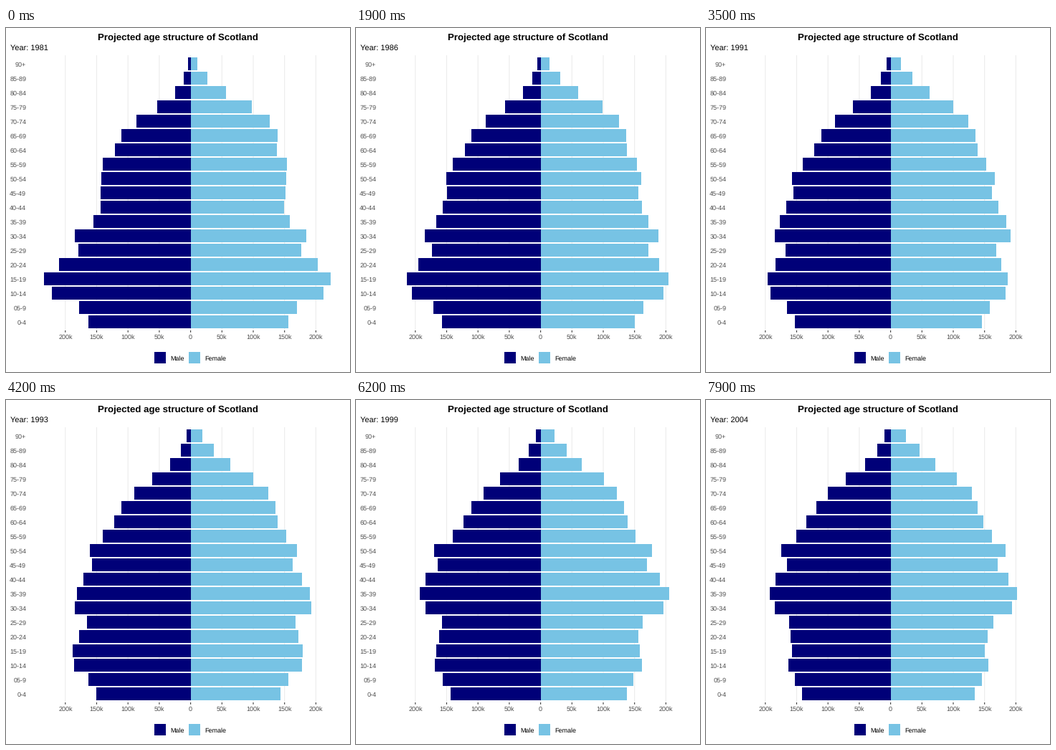
A matplotlib script for the animation above (8000 ms loop, 480 by 480 pixels).

```python
import numpy as np
import matplotlib.pyplot as plt
from matplotlib.animation import FuncAnimation
from matplotlib.patches import Rectangle

SIZE, DPI, FRAMES = 480, 80, 80
NAVY, SKY = "#000078", "#77c3e4"
ZERO, STEP = 257.6, 43.7        # x of the axis and px per 50k people
TOP, PITCH, BAR = 50, 20, 18    # first row centre, row spacing, bar height
KEYS = [0, 66, 133]             # 1981, 2001, 2021; the loop ends in 2004

plt.rcParams.update({"font.family": "Liberation Sans", "text.hinting": "none"})

AGES = ["90+"] + [f"{a}-{a + 4}" for a in range(85, 5, -5)] + ["05-9", "0-4"]
ROW = np.arange(len(AGES))      # 0 is the oldest group


def survival(mid, slope):
    return 1 / (1 + np.exp(-slope * (ROW - mid)))


def aged(groups, rate, young):
    """Move every group up four rows (20 years), refill the youngest."""
    return np.where(ROW < 14, np.roll(groups, -4) * rate, young)


def young(*sizes):
    return np.interp(ROW, [14, 15, 16, 18], sizes)


def pyramid(balance, old, leave, mids):
    """Bar lengths in px at each key time."""
    now = COHORTS * balance * survival(old, 1.03)
    emigrate = leave * np.exp(-((ROW - 11.6) / 1.9) ** 2)
    stay = (1 - 0.4 * leave) * survival(mids[0], 0.75) - emigrate
    mid = aged(now, stay, balance * young(138.5, 141, 144.5, 124.5))
    arrive = 1 + 0.03 * np.maximum(0, ROW - 7)
    end = aged(mid, arrive * survival(mids[1], 0.8),
               balance * young(144, 122, 133, 117))
    return np.array([now, mid, end])


# Cohort sizes: a low before 1920, a post-war rise and the 1960s baby boom
COHORTS = np.interp(
    ROW, [3, 6, 7, 10, 11, 12, 13, 14, 15, 16, 17, 18],
    [128, 113, 125.5, 125.5, 135.5, 161.5, 156.5, 183.5, 204.5, 193.5,
     155.5, 142.5])
MALE = pyramid(np.ones(len(ROW)), 3.55, 0.125, (3.05, 2.1))
FEMALE = pyramid(np.maximum(0.953, 1.2 - 0.0168 * ROW), 2.7, 0.05,
                 (2.05, 1.3))

fig = plt.figure(figsize=(SIZE / DPI, SIZE / DPI), dpi=DPI, facecolor="white")
ax = fig.add_axes([0, 0, 1, 1])
ax.set(xlim=(0, SIZE), ylim=(SIZE, 0))
ax.axis("off")


def rect(x, y, w, h, color, z=2, smooth=False):
    patch = Rectangle((x, y), w, h, fc=color, lw=0, zorder=z, snap=False,
                      antialiased=smooth)
    return ax.add_patch(patch)


def label(x, y, s, px=9, ha="left", color="black", weight="normal"):
    return ax.text(x, y, s, fontsize=px * 72 / DPI, ha=ha, va="baseline",
                   color=color, weight=weight)


label(240, 17, "Projected age structure of Scotland", 13.2, "center",
      weight="bold")
year = label(5.5, 31, "", 11)

for i in range(-4, 5):
    x = ZERO + i * STEP
    rect(x - 0.53, 38, 1.07, 384, "#ebebeb", 1, True)
    rect(x - 0.53, 422, 1.07, 2.75, "#333333", 1, True)
    label(x, 434, f"{abs(i) * 50}k" if i else "0", ha="center",
          color="#4d4d4d")

left, right = [], []
for i, age in enumerate(AGES):
    y = TOP + i * PITCH
    label(28.2, y + 3.6, age, ha="right", color="#4d4d4d")
    right.append(rect(ZERO, y - BAR / 2, 0, BAR, SKY))
    left.append(rect(ZERO, y - BAR / 2, 0, BAR, NAVY))

for x, name, color in ((207, "Male", NAVY), (255, "Female", SKY)):
    rect(x, 452, 16, 16, color)
    label(x + 22, 464, name)


def tween(keys, frame):
    return [np.interp(frame, KEYS, col) for col in keys.T]


def update(frame):
    year.set_text(f"Year: {1981 + frame * 60 // 199}")
    for bar, w in zip(left, tween(MALE, frame)):
        bar.set_x(ZERO - w)
        bar.set_width(w)
    for bar, w in zip(right, tween(FEMALE, frame)):
        bar.set_width(w)
    return [year, *left, *right]


anim = FuncAnimation(fig, update, frames=FRAMES, interval=100,
                     repeat=True, repeat_delay=0, blit=False)
plt.show()
```
